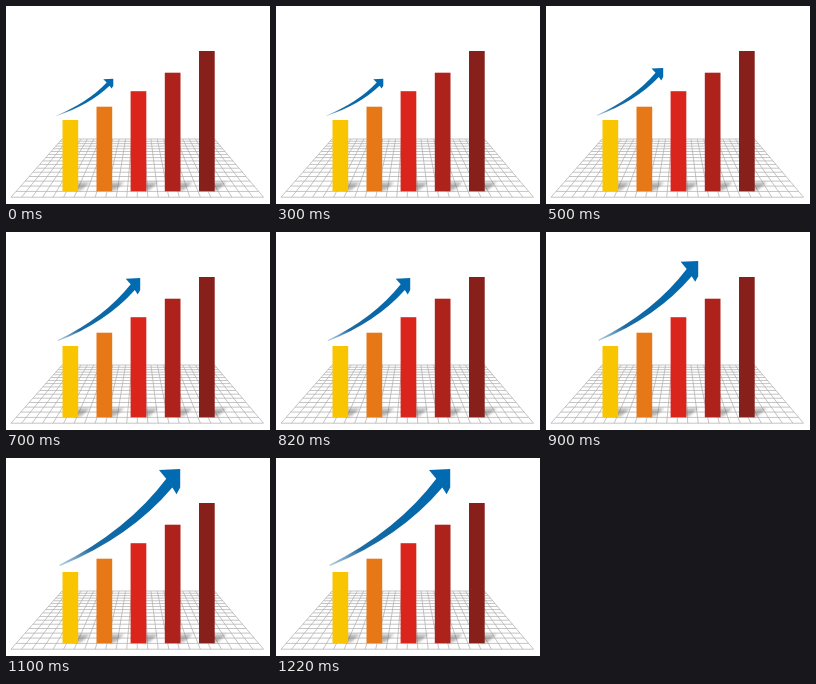
Animation of 264 by 198 pixels, one loop 1300 ms. Source, as an HTML page:

```html
<!DOCTYPE html>
<html lang="en">
<head>
<meta charset="utf-8">
<title>Growth chart</title>
<style>
  html, body { margin: 0; width: 100%; height: 100%; overflow: hidden; background: #fff; }
  svg { display: block; width: 100vw; height: 100vh; }
</style>
</head>
<body>
<svg viewBox="0 0 264 198" xmlns="http://www.w3.org/2000/svg">
  <defs>
    <linearGradient id="ink" x1="0" y1="1" x2="1" y2="0">
      <stop offset="0" stop-color="#3f7fa8" stop-opacity=".35"/>
      <stop offset=".22" stop-color="#1d6ca3"/>
      <stop offset=".5" stop-color="#0867a5"/>
      <stop offset="1" stop-color="#006bb3"/>
    </linearGradient>
    <filter id="soft" x="-40%" y="-60%" width="180%" height="220%">
      <feGaussianBlur stdDeviation="1.3"/>
    </filter>
    <filter id="smooth"><feGaussianBlur stdDeviation=".5"/></filter>
  </defs>
  <path id="grid" fill="none" stroke="#b0b0b0" stroke-width=".75"/>
  <g id="shadows" fill="#555" fill-opacity=".4" filter="url(#soft)"></g>
  <g id="bars"></g>
  <path id="arrow" fill="url(#ink)"/>
</svg>
<script>
const el = id => document.getElementById(id);
const LOOP = 1300;

const bars = [
  [56.5, 114, '#f9c400'],
  [90.5, 100.7, '#e77817'],
  [124.6, 85.2, '#da251c'],
  [158.8, 66.7, '#ae221c'],
  [193, 45, '#871f1a']
];
const BASE = 185.3, BAR_WIDTH = 15.7;

// Arrow poses: start time, tail x and y, tip x and y
const poses = [
  [0, 50, 110, 107.3, 72.8],
  [500, 50.5, 109.7, 117.2, 62],
  [700, 51.5, 109, 134.2, 46],
  [900, 52, 108.7, 152.2, 29],
  [1100, 53, 108, 174.2, 11]
];

function add(parent, tag, attrs) {
  const node = document.createElementNS('http://www.w3.org/2000/svg', tag);
  for (const key in attrs) node.setAttribute(key, attrs[key]);
  parent.appendChild(node);
}

// Floor in perspective: rows are evenly spaced in 1 / width
function floorPath() {
  const far = { y: 133, l: 56, r: 208.5 }, near = { y: 191.2, l: 5, r: 257.5 };
  const rows = 16, cols = 24;
  const mix = (a, b, t) => a + (b - a) * t;
  const farW = far.r - far.l, nearW = near.r - near.l;
  let d = '';
  for (let i = 0; i <= rows; i++) {
    const width = 1 / mix(1 / farW, 1 / nearW, i / rows);
    const t = (width - farW) / (nearW - farW);
    d += `M${mix(far.l, near.l, t)} ${mix(far.y, near.y, t)}H${mix(far.r, near.r, t)}`;
  }
  for (let i = 0; i <= cols; i++) {
    const t = i / cols;
    d += `M${mix(far.l, far.r, t)} ${far.y}L${mix(near.l, near.r, t)} ${near.y}`;
  }
  return d;
}

// Shaft and head in unit coordinates, stretched between tail and tip
function arrowPath([, x0, y0, x1, y1]) {
  const p = (u, v) => `${x0 + (x1 - x0) * u} ${y1 + (y0 - y1) * v} `;
  return `M${p(0, .99)}Q${p(.565, .632)}${p(.885, .1)}L${p(.825, .01)}` +
    `L${p(1, 0)}L${p(1, .19)}L${p(.97, .26)}L${p(.935, .19)}Q${p(.59, .7)}${p(.01, 1)}Z`;
}

function render(time) {
  const t = time % LOOP;
  const pose = poses.filter(p => p[0] <= t).pop();
  el('arrow').setAttribute('d', arrowPath(pose));
  el('arrow').setAttribute('filter', pose[0] >= 500 ? 'url(#smooth)' : 'none');
}

el('grid').setAttribute('d', floorPath());
for (const [x, y, fill] of bars) {
  const right = x + BAR_WIDTH;
  add(el('shadows'), 'path', {
    d: `M${right - 3} ${BASE - .5}L${right + 3} ${BASE - 1}L${right + 12} ${BASE - 9}H${right - 3}Z`
  });
  add(el('bars'), 'rect', { x, y, width: BAR_WIDTH, height: BASE - y, fill });
}

const start = performance.now();
function tick() {
  render(performance.now() - start);
  requestAnimationFrame(tick);
}
tick();
</script>
</body>
</html>
```
